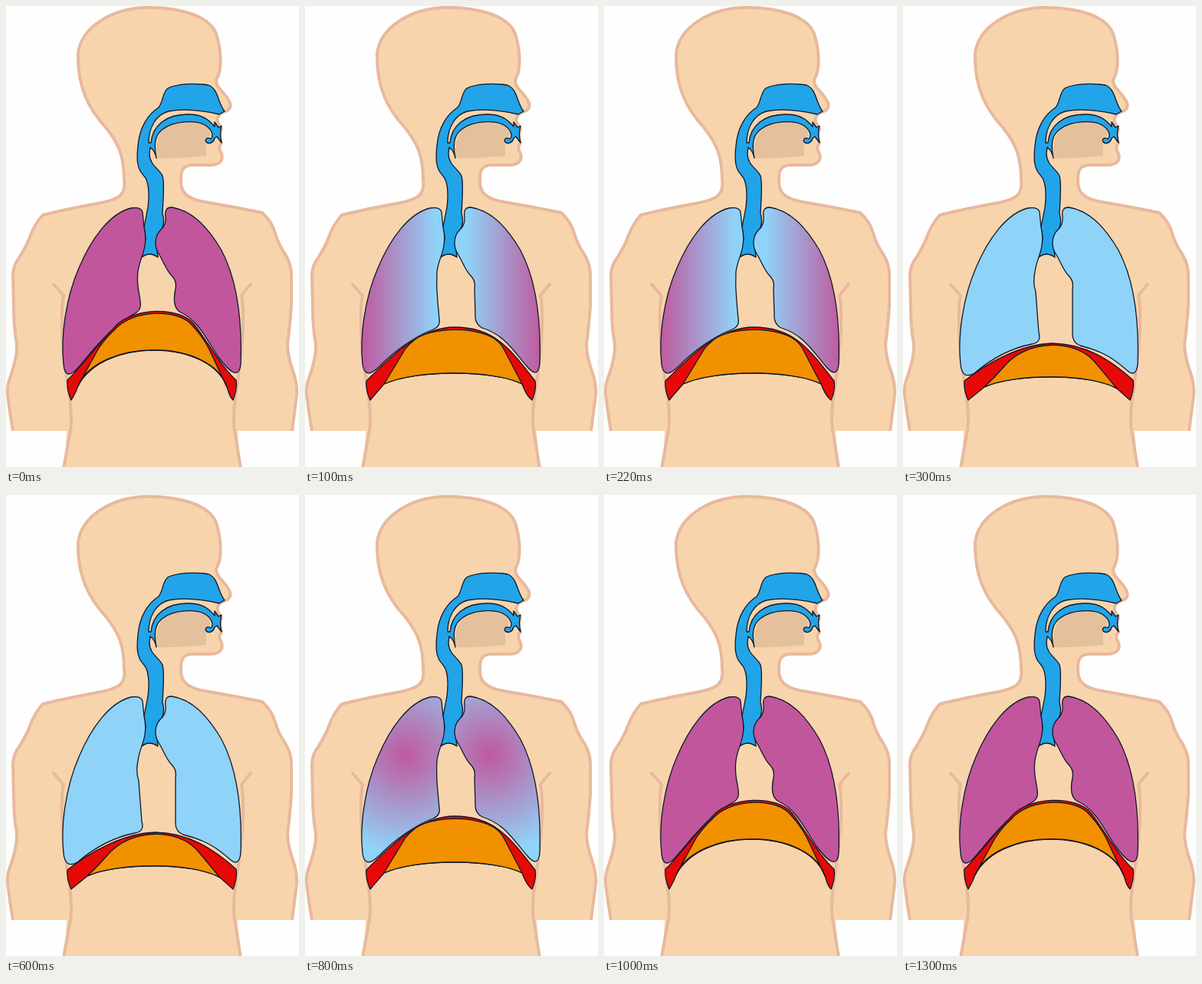
Animation, 382 px wide and 600 px high, one loop 1.5 s. Source, as an HTML page:

```html
<!DOCTYPE html>
<html lang="en">
<head>
<meta charset="utf-8">
<title>Breathing</title>
<style>
html, body { margin: 0; width: 100%; height: 100%; overflow: hidden; background: #fefefe; }
svg { display: block; width: 100%; height: 100%; }
.skin { fill: #f8d4ac; }
.edge { fill: none; stroke: #e8b99d; stroke-width: 4; stroke-linejoin: round; }
.organ { stroke: #10182a; stroke-width: 1.3; stroke-linejoin: round; }
.air { stop-color: #90d3f8; }
.used { stop-color: #c0589d; }
</style>
</head>
<body>
<svg viewBox="0 0 382 600">
  <defs>
    <linearGradient id="inL" gradientUnits="userSpaceOnUse" x1="73" x2="171">
      <stop class="used"/><stop class="air" offset="1"/>
    </linearGradient>
    <linearGradient id="inR" gradientUnits="userSpaceOnUse" x1="309" x2="211">
      <stop class="used"/><stop class="air" offset="1"/>
    </linearGradient>
    <radialGradient id="outL" gradientUnits="userSpaceOnUse" cx="131" cy="338" r="128">
      <stop class="used"/><stop class="air" offset="1"/>
    </radialGradient>
    <radialGradient id="outR" gradientUnits="userSpaceOnUse" cx="241" cy="338" r="128">
      <stop class="used"/><stop class="air" offset="1"/>
    </radialGradient>
  </defs>

  <path id="body" class="skin"/>
  <path class="skin" d="M80 545 H301 L306 600 H76Z"/>
  <path id="outline" class="edge"/>
  <path class="edge" d="M61 361 Q69 370 75 377 C72 390 73 400 73 420 C74 450 79 480 83 510 Q87 540 83 558 L75 602"/>
  <path class="edge" d="M320 361 Q312 370 307 377 C310 390 309 400 309 420 C308 450 303 480 299 510 Q295 540 299 558 L306 602"/>

  <path fill="#e4c19c" d="M196 198 C194 178 200 160 215 154 C235 147 255 151 264 160 L267 168 Q259 173 261 184 L261 195 Q228 199 196 198Z"/>
  <path class="organ" fill="#22a4e9" d="M285 137 C276 126 277 108 264 103 C246 100 223 101 211 107 C204 112 205 125 199 132 C185 141 174 158 172 182 C170 200 171 212 179 220 C187 228 187 245 185 262 L180 288 L182 302 L177 327 Q187 319 198 327 C196 311 196 300 201 293 C206 287 207 280 204 270 C205 250 207 230 204 221 C200 212 187 207 187 192 L188 184 Q194 188 196 198 C192 178 195 167 205 160 C218 150 248 147 261 156 C269 162 271 169 267 173 C262 170 259 174 261 177 C265 181 271 177 272 172 L275 170 L281 178 Q278 166 281 156 L277 158 L272 151 L272 157 C263 146 254 141 237 141 C208 141 191 156 189 178 L186 178 C186 158 196 141 212 137 C231 133 256 136 278 141Z"/>

  <path id="left" class="organ"/>
  <path id="right" class="organ"/>
  <path id="muscle" class="organ" fill="#e70907"/>
  <path id="dome" class="organ" fill="#f29100"/>
</svg>
<script>
const $ = id => document.getElementById(id);

const figure = "M9 553 Q5 530 2 505 Q1 494 7 479 Q15 455 14 440 Q10 418 10 390 L9 350 Q10 336 17 328 Q27 312 31 301 Q37 284 48 272 " +
  "Q85 263 120 257 C146 252 157 247 154 226 C154 196 147 179 130 158 C108 134 93 106 94 62 C98 27 139 2 186 2 C230 2 266 14 274 36 " +
  "C281 58 282 84 274 96 C274 108 284 110 291 124 Q295 131 289 136 L280 140 Q273 146 277 153 L281 160 Q277 169 281 178 Q276 184 280 190 " +
  "C284 198 281 207 267 207 L244 207 C231 207 228 214 228 225 C227 243 236 251 259 255 Q295 261 334 269 Q347 281 351 296 " +
  "Q355 310 364 323 Q372 336 372 350 L372 390 Q370 418 367 440 Q367 455 374 475 Q380 492 379 506 Q376 530 373 553";
$("body").setAttribute("d", figure + "Z");
$("outline").setAttribute("d", figure);

// The lower edge of each lung moves with the diaphragm; the rest stays put.
const leftLung = base => "M75 466 C71 430 78 380 95 341 C111 303 135 270 163 263 Q176 261 178 268 L180 288 Q183 300 181 312 " +
  "C179 325 174 331 172 346 " + base + "Z";
const rightLung = base => "M306 466 C308 410 301 356 281 318 C262 286 242 266 216 262 Q206 262 208 274 Q209 285 202 291 " +
  "C193 300 193 314 200 324 C206 334 209 344 216 351 Q223 358 221 368 " + base + "Z";

const shapes = {
  rest: {
    left: leftLung("C168 373 183 390 170 399 C147 411 130 429 114 447 C98 466 89 479 82 479 Q76 479 75 466"),
    right: rightLung("C218 382 218 394 228 399 C250 408 262 435 277 457 C291 476 304 487 306 466"),
    muscle: "M80 487 C96 472 116 444 139 421 C161 391 228 390 246 415 C263 437 281 470 300 487 Q302 499 296 513 Q292 509 290 502 C272 430 116 430 91 502 Q88 508 85 513 Q79 500 80 487Z",
    dome: "M94 494 L121 445 Q131 431 140 423 C164 394 225 393 244 417 Q256 430 264 445 L288 496 C268 432 122 432 94 494Z"
  },
  half: {
    left: leftLung("Q171 365 173 385 L175 407 Q177 417 167 421 C144 429 116 450 97 469 Q78 488 75 466"),
    right: rightLung("L222 401 Q221 414 231 419 C261 428 274 452 291 471 Q304 485 306 466"),
    muscle: "M80 488 C112 456 150 418 195 418 C246 418 266 444 300 488 Q302 499 296 513 Q289 508 283 492 C245 473 145 473 103 492 L85 513 Q79 500 80 488Z",
    dome: "M103 492 L131 446 Q136 440 140 437 C161 416 232 416 253 438 Q257 442 260 448 L283 492 C245 473 145 473 103 492Z"
  },
  full: {
    left: leftLung("Q169 361 173 372 L177 425 Q181 438 168 440 C137 446 113 461 93 478 Q77 487 75 466"),
    right: rightLung("L221 424 Q220 438 231 442 C263 450 277 461 293 475 Q304 484 306 466"),
    muscle: "M80 488 C108 466 152 440 195 439 C239 440 271 461 300 487 Q302 499 296 513 L279 498 C245 478 145 478 106 496 L85 513 Q79 500 80 488Z",
    dome: "M106 496 Q120 483 132 469 C161 434 222 433 249 462 L279 498 C245 478 145 478 106 496Z"
  }
};

// end time, shape, left fill, right fill
const steps = [
  [100, "rest", "#c1569c", "#c1569c"],
  [300, "half", "url(#inL)", "url(#inR)"],
  [800, "full", "#8fd3f8", "#8fd3f8"],
  [1000, "half", "url(#outL)", "url(#outR)"],
  [1500, "rest", "#c1569c", "#c1569c"]
];

let shown;
function draw() {
  const time = performance.now() % 1500;
  const step = steps.find(s => time < s[0]);
  if (step !== shown) {
    shown = step;
    const [, name, leftFill, rightFill] = step;
    for (const [id, d] of Object.entries(shapes[name])) $(id).setAttribute("d", d);
    $("left").setAttribute("fill", leftFill);
    $("right").setAttribute("fill", rightFill);
  }
  requestAnimationFrame(draw);
}
draw();
</script>
</body>
</html>
```
